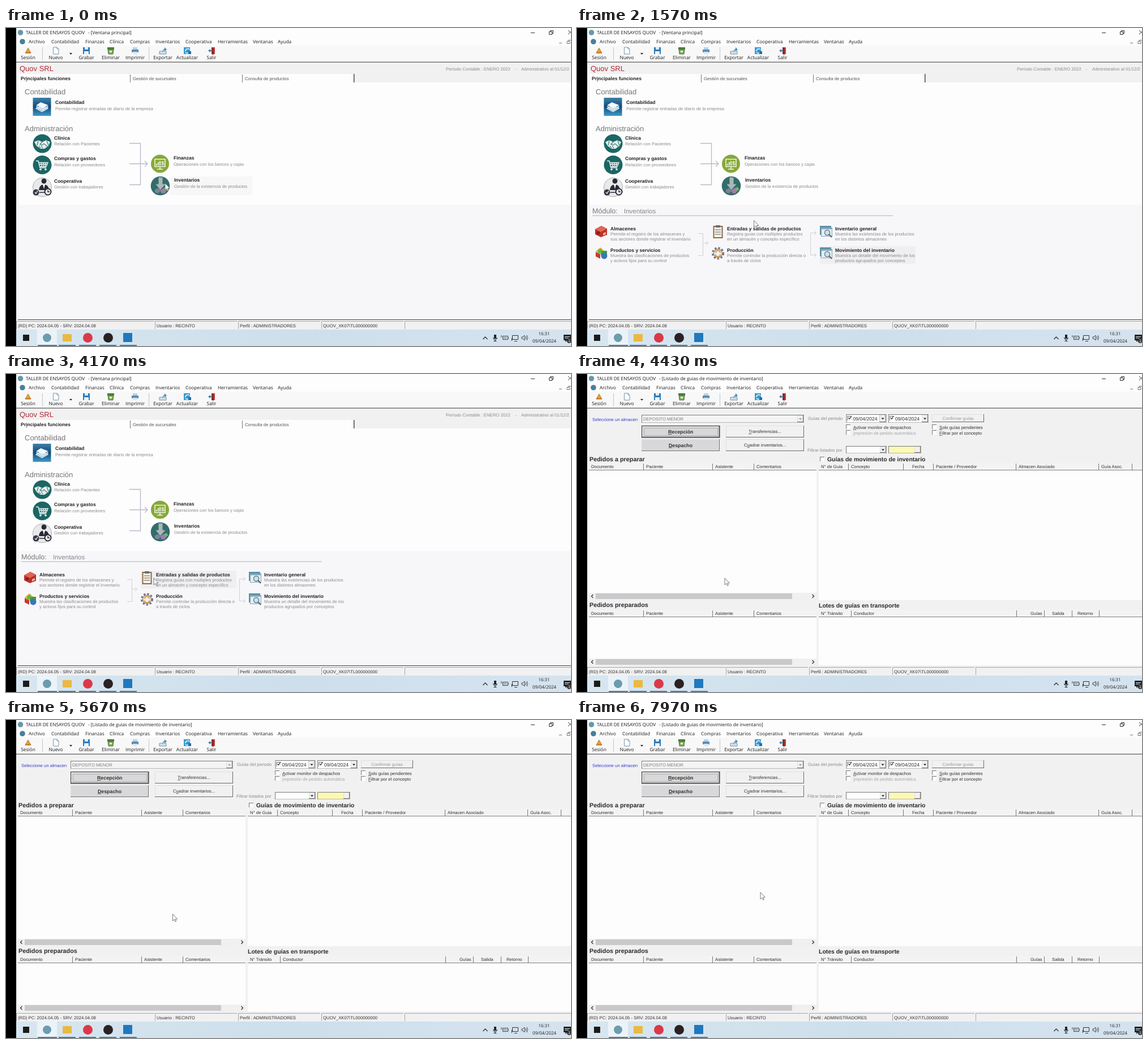
Write an HTML page with a canvas that moves like this. It is 998 px wide and 561 px high and loops after 8 s.

```html
<!DOCTYPE html>
<html lang="es">
<head>
<meta charset="utf-8">
<style>
html, body { margin: 0; width: 100%; height: 100%; overflow: hidden; background: #000; }
canvas { display: block; width: 998px; height: 561px; }
</style>
</head>
<body>
<canvas id="stage" width="998" height="561"></canvas>
<script>
const ctx = document.getElementById('stage').getContext('2d');
ctx.textRendering = 'geometricPrecision';

const SANS = '"Liberation Sans", Arial, sans-serif';
const UI = '"Open Sans", sans-serif';
const INK = '#303030', GRAY = '#8b8b8e', WHITE = '#fdfdfd', FACE = '#f1f1f2';
const TEAL = '#1b6664';

const LOOP = 8000, MODULE_AT = 260, WINDOW_AT = 4400;
// time, x, y of the pointer tip
const POINTER = [
  [0, 281, 274], [250, 281, 274], [530, 295, 274], [900, 295, 275], [1700, 316, 352],
  [2500, 318, 362], [2630, 291, 364], [3050, 246, 361], [3400, 246, 361], [3600, 261, 360],
  [4500, 261, 360], [4970, 268, 364], [6330, 319, 322], [7200, 324, 304], [8000, 324, 304]
];

function rect(x, y, w, h, color) {
  ctx.fillStyle = color;
  ctx.fillRect(x, y, w, h);
}

function path(d, fill, stroke, width = 1) {
  const shape = new Path2D(d);
  if (fill) { ctx.fillStyle = fill; ctx.fill(shape); }
  if (stroke) { ctx.strokeStyle = stroke; ctx.lineWidth = width; ctx.stroke(shape); }
}

function disc(x, y, r, fill, stroke, width = 1) {
  ctx.beginPath();
  ctx.arc(x, y, r, 0, 7);
  if (fill) { ctx.fillStyle = fill; ctx.fill(); }
  if (stroke) { ctx.strokeStyle = stroke; ctx.lineWidth = width; ctx.stroke(); }
}

function at(x, y, draw) {
  ctx.save();
  ctx.translate(x, y);
  draw();
  ctx.restore();
}

// y is the middle of the capitals; "&" underlines the next letter
function text(label, x, y, { size = 7.75, color = INK, bold = false, font = SANS, align = 'left' } = {}) {
  const mark = label.indexOf('&'), plain = label.replace('&', '');
  ctx.font = `${bold ? 'bold ' : ''}${size}px ${font}`;
  ctx.fillStyle = color;
  if (align === 'center') x -= ctx.measureText(plain).width / 2;
  const base = y + size * 0.36;
  ctx.fillText(plain, x, base);
  if (mark >= 0) {
    const start = ctx.measureText(plain.slice(0, mark)).width;
    rect(x + start, base + 1, ctx.measureText(plain[mark]).width, 0.8, color);
  }
}
const ui = (label, x, y, size = 8.3, align) => text(label, x, y, { size, font: UI, color: '#1c1c1c', align });

const toolIcons = {
  bell() { path('M-5 4H5L2-1Q0-8-2-1Z', '#eba23a', '#b5772a'); rect(-5, 2, 10, 3, '#c98735'); },
  page() { path('M-4.500-6H2L5-3V6H-4.500Z', '#fff', '#7795aa'); path('M2-6V-3H5', null, '#7795aa'); },
  disk() { rect(-6, -6, 12, 12, '#2b7bb9'); rect(-3, -6, 6, 4, '#dcecf6'); rect(-4, 1, 8, 5, '#e8f2f8'); },
  bin() { rect(-6, -6, 12, 4, '#4b7d3a'); path('M-5-2H5L4 6H-4Z', '#7cab57', '#587347'); rect(-2, 0, 4, 3, '#e4eed9'); },
  printer() { rect(-4, -6, 8, 4, '#b9d3e6'); rect(-6, -2, 12, 5, '#5e8db3'); rect(-4, 2, 8, 4, '#d9e8f2'); },
  share() { path('M-6 1H6V6H-6Z', '#d2dfe8', '#7995aa'); path('M-1 3Q0-3 3-3V-6L7-2L3 1V-1Q1-1-1 3', '#3e91c4'); },
  refresh() { rect(-6, -6, 11, 12, '#3a9ad2'); path('M-3 1A4 4 0 0 1 4-2M4 1A4 4 0 0 1-3 3', null, '#e9f5fb', 1.5); rect(2, 1, 5, 5, '#1d6fae'); },
  door() { rect(0, -6, 6, 12, '#c83d36'); path('M0-6L4-4V7L0 6Z', '#8d2925'); path('M-6 0L-2-3V-1H1V1H-2V3Z', '#3a83b5'); }
};

function frame() {
  rect(0, 0, 998, 561, '#000');
  rect(18, 0, 980, 561, WHITE);
  disc(25.5, 8, 4.8, '#6598ac');
  ui('TALLER DE ENSAYOS QUOV', 35, 8, 8.3);
  path('M927 8.500H934M959.500 6.500H964.500V11.500H959.500ZM961.500 6V4.500H966.500V9.500H965M993 4L1000 11M993 11L1000 4', null, '#333');
  disc(29, 24, 4.8, '#467f9c');
  [['Archivo', 40], ['Contabilidad', 80], ['Finanzas', 140], ['Clínica', 183], ['Compras', 219],
   ['Inventarios', 264], ['Cooperativa', 317], ['Herramientas', 374], ['Ventanas', 436], ['Ayuda', 480]]
    .forEach(([label, x]) => ui(label, x, 24));
  path('M977 26.500H982M991 23.500H996V27.500H991ZM993 23V21.500H998', null, '#777');

  rect(18, 31, 980, 29, '#f8f8f8');
  [['Sesión', 39, 'bell'], ['Nuevo', 88, 'page'], ['Grabar', 142, 'disk'], ['Eliminar', 185, 'bin'], ['Imprimir', 228, 'printer'],
   ['Exportar', 277, 'share'], ['Actualizar', 320, 'refresh'], ['Salir', 363, 'door']]
    .forEach(([label, x, icon]) => {
      at(x, 40, toolIcons[icon]);
      ui(label, x, 51.5, 8.4, 'center');
    });
  path('M112 44H117L114.500 47Z', '#222');
  path('M64.500 34V57M252.500 34V57', null, '#c4c4c4');
  rect(18, 59.5, 980, 1.5, '#777');
}

function statusAndTaskbar() {
  rect(18, 515, 980, 17, FACE);
  [['(RD) PC: 2024.04.05 - SRV: 2024.04.08', 21, 262], ['Usuario : RECINTO', 266, 408], ['Perfil : ADMINISTRADORES', 413, 555],
   ['QUOV_XK07\\TL000000000', 560, 702], ['', 707, 998]].forEach(([label, x, right]) => {
    text(label, x, 525);
    path(`M${x - 2.5} 531V517.500H${right}`, null, '#a6a6a8');
  });

  const sky = ctx.createLinearGradient(18, 0, 998, 0);
  sky.addColorStop(0, '#d7e6f0');
  sky.addColorStop(0.5, '#cddfeb');
  sky.addColorStop(1, '#d5e3ef');
  rect(18, 532, 980, 29, sky);
  rect(55, 532, 35, 29, '#ebf3f8');
  [55, 92, 128, 164, 200].forEach((x, i) => rect(x + 1, 559, i ? 30 : 34, 2, '#2f7fbd'));
  rect(30, 541, 11, 11, '#1b1b1b');
  disc(72.5, 546.5, 7.5, '#6c9cae');
  rect(100, 540, 16, 13, '#e9b942');
  disc(144.5, 546.5, 8.5, '#dc3848');
  disc(180.5, 546.5, 8.5, '#2b2022');
  rect(207, 538, 16, 16, '#2078bd');

  path('M842.500 549L846.500 545L850.500 549', null, '#333', 1.3);
  rect(862, 541, 4, 7, '#222');
  path('M860.500 546Q861 550 864 550Q867 550 867.500 546M864 550V553M861.500 552.500H866.500', null, '#222');
  path('M877.500 543.500H886.500V549.500H877.500ZM887 545V548M875 542V546M880 545V548M883 545V548', null, '#444');
  path('M894.500 542.500H904.500V549.500H894.500ZM898 552.500H903M893.500 547V552', null, '#333');
  path('M911 545H913L916 542V551L913 548H911ZM918 544Q920 546.500 918 549M920 542Q923 546.500 920 551', null, '#444');
  ui('16:31', 950.5, 539, 7.8, 'center');
  ui('09/04/2024', 951, 552, 7.9, 'center');
  path('M985 541H998V551H991L988 554V551H985Z', '#222');
  path('M987 544.500H996M987 547H994', null, '#dce8f0');
  disc(995, 551.5, 4.5, '#333');
  text('1', 995, 551.5, { size: 7, color: '#fff', align: 'center' });
}

const itemIcons = {
  books() {
    const shade = ctx.createLinearGradient(0, -16, 0, 16);
    shade.addColorStop(0, '#3f80a9');
    shade.addColorStop(0.5, '#0f4a7b');
    shade.addColorStop(1, '#3f9acb');
    rect(-16, -16, 32, 32, shade);
    path('M-11 3L0-2L11 3L0 9Z', '#a9cbdd', '#e6f1f6');
    path('M-10-3L-2-8L11-3L1 3Z', '#f3f8fa');
    path('M-10-2L1 4L11-2V1L1 7L-10 1Z', '#d7e7ef');
  },
  hands() {
    disc(0, 0, 16.5, TEAL);
    path('M-14-3L-7-6L0-3L7-6L14-3L11 4L4 9H-3L-10 4Z', '#e6efed');
    path('M-7-5L-9 3M0-3L-4 1Q0 4 3 0L9 5M-6 4L-3 8M-2 4L1 8M8-5L11 3', null, '#387a78', 1.2);
  },
  cart() {
    disc(0, 0, 16.5, TEAL);
    path('M-11-7H-7L-4 5H7M-6-4H10L7 3H-5M-2-4L-1 3M2-4V3M6-4L5 3M-6-1H9', null, '#f1f6f5', 1.4);
    disc(-3, 8, 1.8, '#fff');
    disc(6, 8, 1.8, '#fff');
  },
  worker() {
    disc(0, 0, 16.5, '#e9e9ec', '#aaaab2');
    disc(3, -11, 4.5, '#282b32');
    path('M-6 5Q-5-5 3-5Q11-5 12 5Z', '#272b35');
    path('M1-5L3 3L5-5Z', '#fff');
    disc(-11, 9, 5.5, '#343a48');
    path('M-13 9L-11 11L-8 6', null, '#fff', 1.3);
    disc(10, 8, 5.5, '#eee', '#292c33', 2);
    path('M10 5V8H13M-5 9H4', null, '#292c33', 1.5);
  },
  screen() {
    disc(0, 0, 16, '#86a83a');
    path('M-9-8H9V5H-9ZM0 5V9M-5 9.500H5', null, '#f3f7e5', 1.5);
    path('M-6 3V0M-3 3V-3M0 3V-5', null, '#f3f7e5', 1.8);
    text('$', 2, -1, { size: 10, color: '#f3f7e5', bold: true });
  },
  stock() {
    disc(0, 0, 16.8, '#326d6c');
    path('M-3-15H4V-3H9L0 7L-8-3H-3Z', '#a9b7b8');
    path('M-10 7L-4 4L1 8L-3 13L-9 12Z', '#7d8590');
    path('M0 8L5 4L11 8L8 13L2 13Z', '#a37cad');
    path('M6 4L11 2L14 6L10 9Z', '#78b36d');
  },
  store() {
    path('M-11-4L0-10L10-5V6L-1 10L-11 5Z', '#bd3028');
    path('M-11-4L0-10L10-5L-1 1Z', '#df6655');
    rect(-8, 0, 5, 5, '#7f231e');
    path('M3 3L8 1V5L3 7Z', '#ecb0a0');
  },
  shapes() {
    path('M-10-3L-2-10L5-4L-2 2Z', '#e7b52d');
    path('M-10-2L-2 2V10L-10 6Z', '#c63b31');
    rect(-1, -4, 11, 8, '#3b9e45');
    disc(5, 5, 5.5, '#3976b6');
    path('M-5-6L1-8L0 0L-7 1Z', '#68b34e');
  },
  clipboard() {
    path('M-7.500-9H7.500V11H-7.500Z', '#f6f2e8', '#8a6c49', 2);
    rect(-4, -11, 8, 4, '#6c6c70');
    path('M-4-3H5M-4 1H5M-4 5H5', null, '#8e9196', 1.3);
    path('M-5-3H-3M-5 1H-3M-5 5H-3', null, '#d0883c', 1.5);
  },
  gear() {
    ctx.setLineDash([3.4, 3]);
    disc(0, 0, 9.5, null, '#77777c', 3.2);
    ctx.setLineDash([]);
    disc(0, 0, 7.5, '#f4f0ea', '#8a8a8d', 1.5);
    path('M-4-1A4 4 0 0 1 4-1M4 2A4 4 0 0 1-4 2', null, '#dc933b', 2);
  },
  search() {
    rect(-11, -10, 20, 16, '#5d8fa8');
    rect(-9, -7, 20, 16, '#84a9bb');
    rect(-8, -4, 18, 12, '#e4edf1');
    disc(2, 2, 4.5, '#cfe3ec', '#667d8a', 1.5);
    path('M5 5L10 10', null, '#5c6267', 2.3);
  }
};

function item(icon, iconX, iconY, title, x, y, ...lines) {
  at(iconX, iconY, itemIcons[icon]);
  text(title, x, y, { size: 8.5, bold: true, color: '#222' });
  lines.forEach((line, i) => text(line, x, y + (lines.length > 1 ? 9.5 : 11) + i * 9.3, { color: GRAY }));
}

const heading = (label, x, y, size = 13, color = '#77777a') => text(label, x, y, { size, color });

function mainWindow(time, [, py]) {
  ui('- [Ventana principal]', 145, 8, 8.2);
  rect(18, 61, 980, 454, FACE);
  heading('Quov SRL', 24, 71, 13, '#b02a35');
  text('Período Contable : ENERO 2022', 777, 72, { color: GRAY });
  text('-', 899, 72, { color: GRAY });
  text('Administrativo al 01/12/2', 910, 72, { color: GRAY });
  rect(22, 81, 594, 16, WHITE);
  rect(22, 96, 976, 217, WHITE);
  rect(22, 312, 976, 202, '#f7f7fa');
  rect(21, 514, 977, 1, '#444');
  text('Pr&incipales funciones', 26, 89, { size: 8.5, bold: true, color: '#222' });
  text('Gestión de sucursales', 224, 89.5, { color: '#555' });
  text('Consulta de productos', 422, 89.5, { color: '#555' });
  path('M219.500 82V96M417.500 82V96', null, '#777');
  rect(614, 81, 1.5, 15, '#444');

  if (py < 294) rect(290, 262, 145, 33, '#f7f7f8');
  heading('Contabilidad', 33, 112.5);
  heading('Administración', 33, 177);
  item('books', 63.5, 139, 'Contabilidad', 87, 131, 'Permite registrar entradas de diario de la empresa');
  item('hands', 64, 204, 'Clínica', 85, 193.5, 'Relación con Pacientes');
  item('cart', 64, 241.5, 'Compras y gastos', 85, 230, 'Relación con proveedores');
  item('worker', 64, 281, 'Cooperativa', 85, 269.5, 'Gestión con trabajadores');
  item('screen', 272, 239.5, 'Finanzas', 296, 229, 'Operaciones con los bancos y cajas');
  item('stock', 272.5, 278.5, 'Inventarios', 297, 268, 'Gestión de la existencia de productos');
  path('M218 203.500H237.500V276.500H218M218 239.500H249M245 234.500L250 239.500L245 244.500', null, '#b9b9c6', 1.3);
  if (time < MODULE_AT) return;

  if (py > 346) rect(238, 347, 169, 31, '#efeff1');
  else rect(429, 385, 169, 31, '#efeff1');
  heading('Módulo:', 27, 322.5, 12.6);
  heading('Inventarios', 83, 322.5, 11.5, '#858588');
  rect(27, 330.5, 531, 1, '#b2b2b5');
  item('store', 43, 359, 'Almacenes', 59, 353.5, 'Permite el registro de los almacenes y', 'sus sectores donde registrar el inventario');
  item('shapes', 43, 397, 'Productos y servicios', 59, 391.5, 'Muestra las clasificaciones de productos', 'y activos fijos para su control');
  item('clipboard', 249, 359, 'Entradas y salidas de productos', 265, 353.5, 'Registra guías con múltiples productos', 'en un almacén y concepto específico');
  item('gear', 249, 397.5, 'Producción', 265, 391.5, 'Permite controlar la producción directa o', 'a través de ciclos');
  item('search', 440, 359, 'Inventario general', 456, 353.5, 'Muestra las existencias de los productos', 'en los distintos almacenes');
  item('search', 440, 397, 'Movimiento del inventario', 456, 391.5, 'Muestra un detalle del movimiento de los', 'productos agrupados por conceptos');
  path('M214 362.500H222.500V401.500H214M222 379.500H231M228 376L231.500 379.500L228 383', null, '#cfcfd6');
  path('M422 361.500H412.500V400.500H422M419 358L422.500 361.500L419 365M419 397L422.500 400.500L419 404', null, '#cfcfd6');
}

function bevel(x, y, w, h, fill = FACE) {
  rect(x, y, w, h, '#707072');
  rect(x, y, w - 1, h - 1, '#e0e0e0');
  rect(x + 1, y + 1, w - 2.5, h - 2.5, fill);
}

function button(label, x, y, w, h, { fill, ...style } = {}) {
  bevel(x, y, w, h, fill);
  text(label, x + w / 2, y + h / 2, { align: 'center', ...style });
}

function field(x, y, w, h, fill, arrow) {
  rect(x, y, w, h, '#7c7c7e');
  rect(x + 1, y + 1, w - 1.5, h - 1.5, fill);
  bevel(x + w - 12, y + 1, 11, h - 2);
  if (arrow) path(`M${x + w - 9} ${y + h / 2 - 1}h5l-2.500 3z`, arrow);
}

function checkbox(x, y, label, color = INK) {
  rect(x, y, 8, 8, '#777');
  rect(x + 1, y + 1, 7, 7, '#fff');
  if (label) text(label, x + 13, y + 5, { color });
}

function datePicker(x) {
  field(x, 71, 71, 15, WHITE, '#222');
  checkbox(x + 2, 74);
  path(`M${x + 4} 77l2 2.500l3-5`, null, '#222', 1.2);
  text('09/04/2024', x + 12, 78.5, { size: 8.6 });
}

function table(x, right, y, bottom, columns) {
  rect(x, y, right - x, bottom - y, WHITE);
  rect(x, y, right - x, 13, '#f3f3f3');
  rect(x, y + 12, right - x, 1, '#808080');
  columns.forEach(([label, labelX, divider]) => {
    text(label, labelX, y + 6.5);
    if (divider) rect(divider, y + 1, 1, 12, '#777');
  });
}

function scrollbar(y) {
  rect(21, y, 402, 12, '#f0f0f1');
  rect(33, y + 1, 347, 10, '#c9c9cb');
  path(`M28.500 ${y + 3}l-3 3l3 3M415.500 ${y + 3}l3 3l-3 3`, null, '#333', 1.3);
}

function listWindow() {
  ui('- [Listado de guias de movimiento de inventario]', 145, 8, 8.2);
  rect(18, 61, 980, 454, FACE);
  text('Seleccione un almacen', 27, 80, { color: '#3a3ac8' });
  field(114, 72, 287, 14, '#f4f4f4', '#999');
  text('DEPOSITO MENOR', 117, 79, { color: '#7d7d80' });
  const strong = { size: 8.8, bold: true, fill: '#d8d8da' };
  rect(114, 91, 138.5, 21.5, '#333');
  button('&Recepción', 115, 92, 136.5, 19.5, strong);
  ctx.setLineDash([1, 1]);
  path('M118.500 95.500H248.500V108.500H118.500Z', null, '#888');
  ctx.setLineDash([]);
  button('&Despacho', 114, 115, 138, 21, strong);
  button('&Transferencias...', 263, 91, 138, 21);
  button('C&uadrar inventarios...', 263, 115, 138, 21);
  text('Guías del periodo', 408, 78.5, { color: GRAY });
  datePicker(475.5);
  datePicker(550);
  button('Confirmar guías', 627, 71, 92, 14, { color: '#98989b' });
  checkbox(475, 89, '&Activar monitor de despachos');
  checkbox(475, 99, '&Impresión de pedido automática', '#a5a5a8');
  checkbox(627, 89, '&Solo guías pendientes');
  checkbox(627, 99, '&Filtrar por el concepto');
  text('Filtrar listados por', 407, 134, { color: GRAY });
  field(475, 127, 72, 13, WHITE, '#222');
  field(550, 127, 58, 13, '#fdf8b5');

  const caption = (label, x, y, size) => text(label, x, y, { size, bold: true, color: '#2b2b2b' });
  caption('Pedidos a preparar', 22, 150, 10.8);
  caption('Pedidos preparados', 22, 407, 10.8);
  checkbox(429, 146);
  caption('Guías de movimiento de inventario', 442, 150, 10.45);
  caption('Lotes de guías en transporte', 427, 408.5, 10.45);

  const orders = [['Documento', 25, 117], ['Paciente', 122, 239], ['Asistente', 244, 312], ['Comentarios', 317]];
  table(21, 423, 157, 386, orders);
  table(21, 423, 416, 502, orders);
  scrollbar(386);
  scrollbar(502);
  table(427, 998, 157, 399, [['N° de Guia', 431, 479], ['Concepto', 484, 576], ['Fecha', 592, 629],
    ['Paciente / Proveedor', 634, 775], ['Almacen Asociado', 780, 921], ['Guía Asoc.', 926, 980]]);
  table(427, 998, 416, 514, [['N° Tránsito', 431, 484], ['Conductor', 489, 776], ['Guías', 801, 825],
    ['Salida', 839, 874], ['Retorno', 884, 922]]);
}

function pointerAt(time) {
  const next = POINTER.findIndex(([t]) => t > time);
  const [t0, x0, y0] = POINTER[next - 1], [t1, x1, y1] = POINTER[next];
  const k = (time - t0) / (t1 - t0);
  return [x0 + (x1 - x0) * k, y0 + (y1 - y0) * k];
}

function draw(now) {
  const time = now % LOOP, pointer = pointerAt(time);
  frame();
  if (time < WINDOW_AT) mainWindow(time, pointer);
  else listWindow();
  statusAndTaskbar();
  at(...pointer, () => path('M0 0V12L2.800 9.500L4.700 13.500L6.500 12.700L4.700 8.800H8.300Z', '#fff', '#77777c'));
  requestAnimationFrame(draw);
}
requestAnimationFrame(draw);
</script>
</body>
</html>
```
